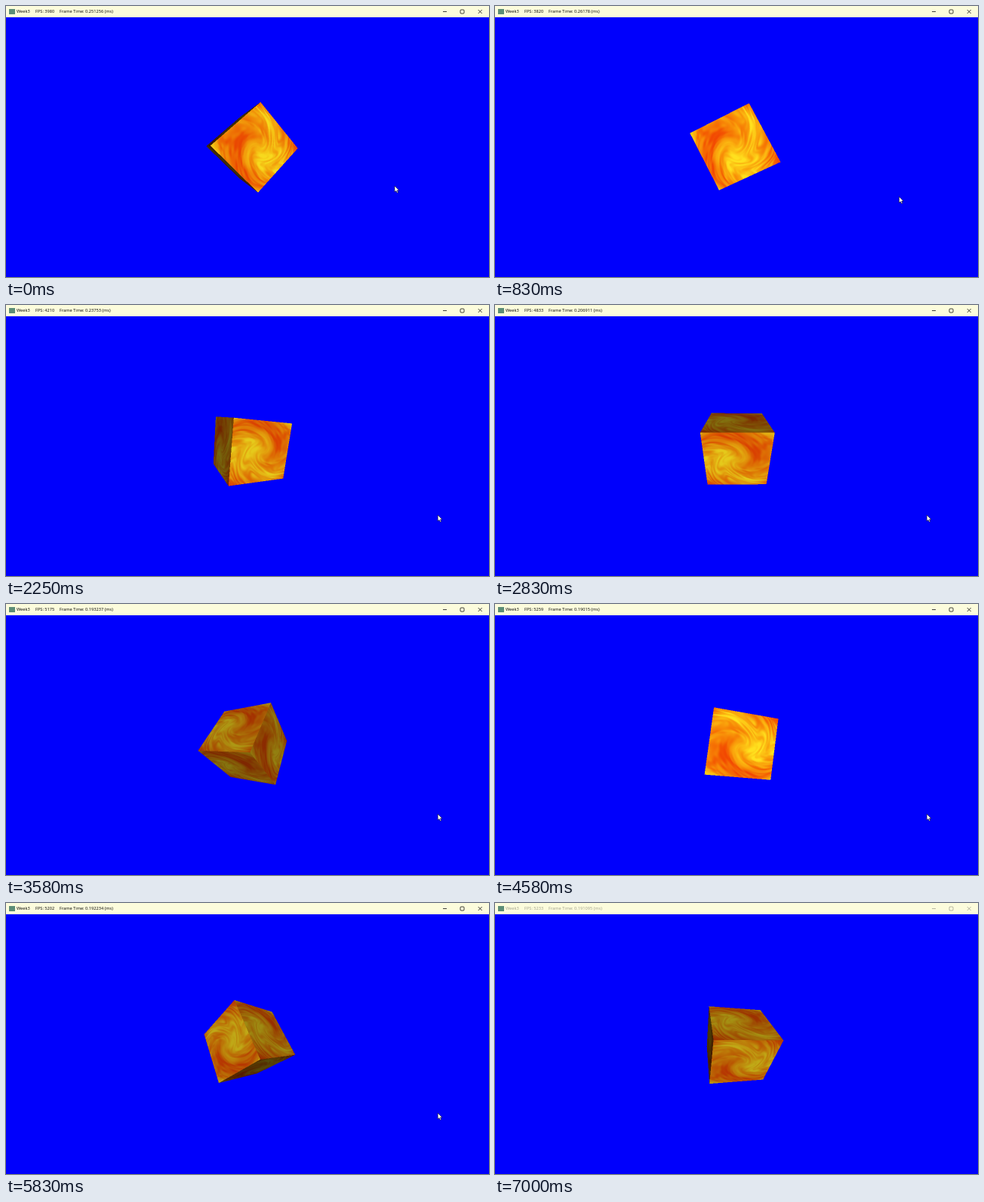
Recreate the animation shown at these times as an HTML page with a canvas. Size 640x360 px, loop 7080 ms.

```html
<!DOCTYPE html>
<html lang="en">
<head>
<meta charset="utf-8">
<title>Spinning cube</title>
<style>
  html, body { margin: 0; width: 100%; height: 100%; overflow: hidden; background: #0000fc; }
  #stage { position: absolute; left: 0; top: 0; width: 640px; height: 360px; overflow: hidden; }
  canvas { display: block; }
  #bar span {
    position: absolute; top: 0; white-space: pre; color: #000;
    font: 5.65px/15px "Open Sans", "Noto Sans", sans-serif;
  }
  #name { left: 14px; }
  #fps { left: 39px; }
  #cost { left: 71px; }
</style>
</head>
<body>
<div id="stage">
  <canvas id="view" width="640" height="360"></canvas>
  <div id="bar"><span id="name">Week3</span><span id="fps"></span><span id="cost"></span></div>
</div>
<script>
const LOOP = 7080, STEPS = 85, STEP = LOOP / STEPS;
const ctx = document.getElementById("view").getContext("2d");
const bar = document.getElementById("bar");
const fpsText = document.getElementById("fps");
const costText = document.getElementById("cost");

// Keyed values: [time in ms, value]
const SPIN = [[0, 1.556], [500, 1.82], [1670, 2.84], [2830, 3.98], [3580, 4.75],
              [4580, 5.75], [5830, 6.96], [6530, 7.65]];
const POINTER_Y = [[0, 239], [750, 251], [1500, 272], [1670, 275.2], [1900, 279]];
const RATES = [3980, 3820, 3700, 3614, 4210, 4833, 5021, 5175, 5204, 5259, 5231, 5202, 5218, 5233];

const clamp = (v, a = 0, b = 1) => Math.min(b, Math.max(a, v));
const mix = (a, b, k) => a + (b - a) * k;

function track(keys, t) {
  for (let i = 1; i < keys.length; i++) {
    const [t0, a] = keys[i - 1], [t1, b] = keys[i];
    if (t < t1) return mix(a, b, (t - t0) / (t1 - t0));
  }
  return keys[keys.length - 1][1];
}

// ---- fire texture ----
const TEX = 256;

function hash(x, y) {
  const s = Math.sin(x * 127.1 + y * 311.7) * 43758.5453;
  return s - Math.floor(s);
}

function noise(x, y) {
  const ix = Math.floor(x), iy = Math.floor(y);
  const fx = x - ix, fy = y - iy;
  const sx = fx * fx * (3 - 2 * fx), sy = fy * fy * (3 - 2 * fy);
  return mix(mix(hash(ix, iy), hash(ix + 1, iy), sx),
             mix(hash(ix, iy + 1), hash(ix + 1, iy + 1), sx), sy);
}

function heat(x, y) {
  const r = Math.hypot(x, y);
  const turn = 3.1 * Math.exp(-1.5 * r);
  const c = Math.cos(turn), s = Math.sin(turn);
  const qx = x * c - y * s, qy = x * s + y * c;
  const warp = noise(qx * 2 + 7, qy * 2 + 3) - 0.5;
  const streak = 0.6 * noise(qx * 2.2 + 11, qy * 8 + warp * 5)
               + 0.4 * noise(qx * 5 + 31, qy * 17 + warp * 8);
  const corner = clamp((r - 1.05) * 3) * 0.5 * y;
  return clamp(0.52 + 0.3 * Math.sin(3 * qy - 0.9 * qx + 0.3) + 0.9 * (streak - 0.5) - corner);
}

const texture = (() => {
  const data = new Uint8ClampedArray(TEX * TEX * 3);
  for (let j = 0; j < TEX; j++) {
    for (let i = 0; i < TEX; i++) {
      const v = heat((i + 0.5) / TEX * 2 - 1, (j + 0.5) / TEX * 2 - 1);
      const o = (j * TEX + i) * 3;
      data[o] = mix(242, 255, v);
      data[o + 1] = mix(72, 224, v);
      data[o + 2] = mix(2, 30, v * v);
    }
  }
  return data;
})();

// ---- cube, ray cast at double size ----
const BOX = { x: 246, y: 114, size: 148 };
const RES = BOX.size * 2;
const layer = document.createElement("canvas");
layer.width = layer.height = RES;
const layerCtx = layer.getContext("2d");
const image = layerCtx.createImageData(RES, RES);

// Rows are the cube's axes as (right, up, towards the viewer).
function axes(spin) {
  const yaw = spin * Math.PI / 4, roll = spin * Math.PI / 6;
  const cy = Math.cos(yaw), sy = Math.sin(yaw);
  const cr = Math.cos(roll), sr = Math.sin(roll);
  return [[cy, 0, sy], [-sy * cr, sr, cy * cr], [sy * sr, cr, -cy * sr]];
}

function drawCube(spin) {
  const m = axes(spin), eye = m.map(a => a[2] * 5);
  const px = image.data, dir = [0, 0, 0], hit = [0, 0, 0];
  px.fill(0);
  for (let j = 0; j < RES; j++) {
    const y = (187.5 - BOX.y - (j + 0.5) / 2) / 172.5;
    for (let i = 0; i < RES; i++) {
      const x = (BOX.x + (i + 0.5) / 2 - 320.5) / 180;
      let near = -Infinity, far = Infinity, side = 0;
      for (let k = 0; k < 3; k++) {
        const d = dir[k] = (m[k][0] * x + m[k][1] * y - m[k][2]) || 1e-9;
        const sign = d > 0 ? -1 : 1;
        const enter = (sign - eye[k]) / d, leave = (-sign - eye[k]) / d;
        if (enter > near) { near = enter; side = k; }
        if (leave < far) far = leave;
      }
      if (near >= far) continue;
      for (let k = 0; k < 3; k++) hit[k] = eye[k] + dir[k] * near;
      const sign = dir[side] > 0 ? -1 : 1;
      const u = side === 0 ? -hit[1] : side === 1 ? sign * hit[0] : hit[0];
      const v = side === 0 ? sign * hit[2] : side === 1 ? hit[2] : -sign * hit[1];
      const tx = clamp(Math.floor((u + 1) / 2 * TEX), 0, TEX - 1);
      const ty = clamp(Math.floor((v + 1) / 2 * TEX), 0, TEX - 1);
      const light = clamp(sign * m[side][2] * 1.03, 0.05, 1);
      const o = (j * RES + i) * 4, s = (ty * TEX + tx) * 3;
      px[o] = texture[s] * light;
      px[o + 1] = texture[s + 1] * light;
      px[o + 2] = texture[s + 2] * light;
      px[o + 3] = 255;
    }
  }
  layerCtx.putImageData(image, 0, 0);
  ctx.drawImage(layer, BOX.x, BOX.y, BOX.size, BOX.size);
}

// ---- window parts ----
function drawBar(ink) {
  ctx.fillStyle = "#fcfcdc";
  ctx.fillRect(0, 0, 640, 15);
  ctx.fillStyle = "#5c8d76";
  ctx.fillRect(4, 4, 8, 7);
  ctx.globalAlpha = ink;
  ctx.strokeStyle = "#111";
  ctx.lineWidth = 0.8;
  ctx.beginPath();
  ctx.moveTo(579, 7.5);
  ctx.lineTo(584, 7.5);
  ctx.roundRect(602, 5, 5, 5, 1);
  ctx.moveTo(625.7, 5);
  ctx.lineTo(630.7, 10);
  ctx.moveTo(630.7, 5);
  ctx.lineTo(625.7, 10);
  ctx.stroke();
  ctx.globalAlpha = 1;
}

function drawPointer(x, y) {
  const shape = [[0, 0], [0, 8], [1.9, 6.4], [3.2, 9.2], [4.5, 8.6], [3.2, 5.9], [5.6, 5.8]];
  ctx.beginPath();
  shape.forEach(([dx, dy]) => ctx.lineTo(x + dx, y + dy));
  ctx.closePath();
  ctx.fillStyle = "#fff";
  ctx.fill();
  ctx.strokeStyle = "#000";
  ctx.lineWidth = 0.5;
  ctx.stroke();
}

function draw(t) {
  const ink = mix(1, 0.36, clamp((t - 6660) / 330));
  ctx.fillStyle = "#0000fc";
  ctx.fillRect(0, 0, 640, 360);
  drawCube(track(SPIN, t));
  if (t < 6580) {
    const y = track(POINTER_Y, t);
    drawPointer(515 + (y - 239) * 1.43, y);
  }
  drawBar(ink);

  const rate = RATES[Math.min(RATES.length - 1, Math.floor((t + 100) / 500))];
  fpsText.textContent = "FPS: " + rate;
  costText.textContent = "Frame Time: " + Number((1000 / rate).toPrecision(6)) + " (ms)";
  bar.style.opacity = ink;
}

const start = performance.now();
let last = -1;

function tick() {
  const t = (performance.now() - start) % LOOP;
  const step = Math.min(STEPS - 1, Math.floor((t + 7) / STEP));
  if (step !== last) {
    last = step;
    draw(step * STEP);
  }
  requestAnimationFrame(tick);
}
tick();
</script>
</body>
</html>
```
